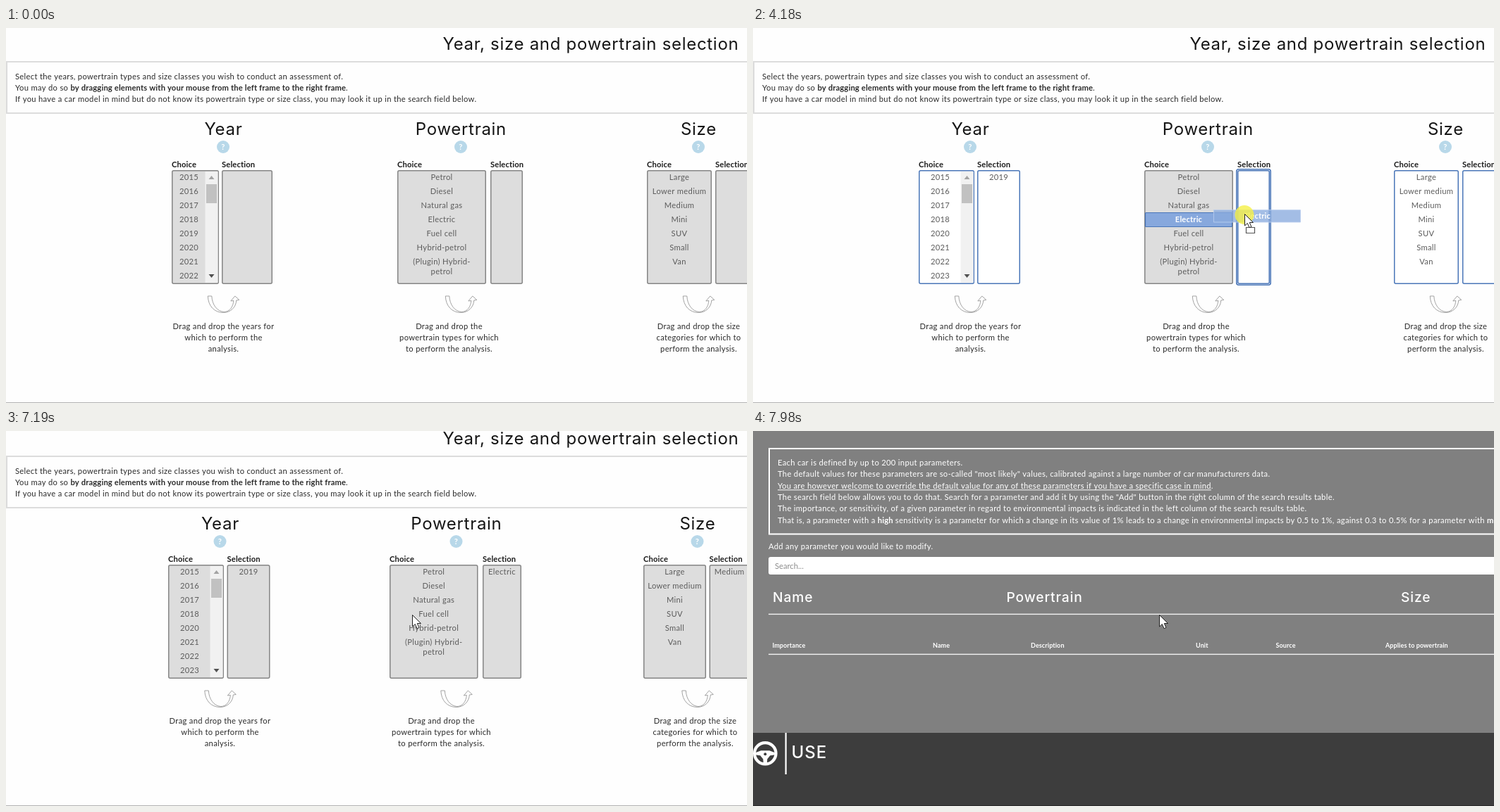
These frames come from a looping animation (1051 by 533 pixels, 8 s). An HTML page with a canvas:

```html
<!DOCTYPE html>
<html lang="en">
<head>
<meta charset="utf-8">
<title>Year, size and powertrain selection</title>
<style>
  html, body { margin: 0; width: 100%; height: 100%; overflow: hidden; background: #fff; }
  canvas { display: block; }
</style>
</head>
<body>
<canvas id="stage" width="1051" height="533"></canvas>
<script>
const LOOP = 8000, W = 1051, H = 533;
const ctx = document.getElementById('stage').getContext('2d');

const BLUE = '#4a76b8', ROW = '#87a8dd', GREY = '#dddddd', EDGE = '#858585';
const BODY = ['11.2px Lato, sans-serif', 0.32];
const BOLD = ['bold 11.2px Lato, sans-serif', 0.15];
const SMALL = ['bold 9px Lato, sans-serif', 0.1];
const HEAD = ['24px Inter, sans-serif', 0.7];
const CAPS = ['500 24px Inter, sans-serif', 1];
const TABLE = ['500 19.2px Inter, sans-serif', 0.9];

const columns = [
  { name: 'Year', pick: 4, scrolls: true,
    items: Array.from({ length: 12 }, (_, i) => String(2015 + i)),
    note: ['Drag and drop the years for', 'which to perform the', 'analysis.'] },
  { name: 'Powertrain', pick: 3,
    items: ['Petrol', 'Diesel', 'Natural gas', 'Electric', 'Fuel cell', 'Hybrid-petrol', '(Plugin) Hybrid-\npetrol'],
    note: ['Drag and drop the', 'powertrain types for which', 'to perform the analysis.'] },
  { name: 'Size', pick: 2,
    items: ['Large', 'Lower medium', 'Medium', 'Mini', 'SUV', 'Small', 'Van'],
    note: ['Drag and drop the size', 'categories for which to', 'perform the analysis.'] }
];

// Per column after each drop: heading, note, choice x and width, selection x and width
const layouts = [
  [[308, 308.5, 235, 67, 306, 72], [645, 628.5, 555, 126, 687, 46], [982, 982.5, 909, 92, 1006, 50]],
  [[308, 308.5, 235, 79, 318, 61], [645, 628.5, 555, 126, 687, 46], [982, 982.5, 909, 92, 1006, 50]],
  [[306, 306, 232.5, 79, 316, 61], [645, 624.5, 551, 125, 683, 54], [985, 985.5, 912, 91.5, 1008, 50]],
  [[303.5, 303.5, 230, 79, 313.5, 61], [638.5, 617.5, 544, 125.5, 676, 55], [980.5, 977.5, 904, 89, 997.5, 57]]
];

const drags = [
  { press: 1520, move: 1600, drop: 2090 },
  { press: 3570, move: 3710, drop: 4260 },
  { press: 5400, move: 5480, drop: 6320 }
];

// Pointer bursts: start, end, number of steps
const bursts = [
  [570, 1040, 7], [1520, 2090, 8], [2380, 3160, 11], [3240, 3310, 2],
  [3710, 4260, 8], [4550, 5320, 11], [5400, 6170, 11], [6650, 6870, 4]
];
const path = [
  [570, 167, 86], [1040, 268, 286], [1560, 268, 286], [2010, 332, 280], [2300, 332, 280],
  [2840, 619, 244], [3160, 621, 269], [3310, 621, 272], [3640, 621, 272], [4180, 697, 264],
  [4260, 698, 265], [4470, 698, 265], [5320, 944, 257], [5480, 944, 257], [6170, 1015, 247],
  [6580, 1014, 247], [6870, 576, 261]
];
const scrolls = [
  [0, 0], [7100, 2], [7190, 12], [7250, 50], [7330, 115], [7410, 195], [7490, 280],
  [7560, 355], [7640, 428], [7720, 490], [7810, 550], [7900, 595], [7980, 614]
];

const lastBefore = (list, t) => list.filter(e => e[0] <= t).pop();

function stepTime(t) {
  const burst = lastBefore(bursts, t);
  if (!burst) return t;
  const [from, to, n] = burst, gap = (to - from) / (n - 1);
  return Math.min(to, from + gap * Math.floor((t - from + 15) / gap));
}

function pointerAt(t) {
  if (t < path[0][0]) return null;
  const s = stepTime(t), a = lastBefore(path, s), b = path[path.indexOf(a) + 1];
  if (!b) return { x: a[1], y: a[2] };
  const u = (s - a[0]) / (b[0] - a[0]), e = u * u * (3 - 2 * u);
  return { x: a[1] + (b[1] - a[1]) * e, y: a[2] + (b[2] - a[2]) * e };
}

function setFont([font, gap]) {
  ctx.font = font;
  ctx.letterSpacing = gap + 'px';
}

function text(str, x, y, style, color, align = 'left') {
  setFont(style);
  ctx.textAlign = align;
  ctx.fillStyle = color;
  ctx.fillText(str, x, y);
  return ctx.measureText(str).width;
}

// Asterisks switch bold on and off
function rich(str, x, y, color) {
  str.split('*').forEach((part, i) => { x += text(part, x, y, i % 2 ? BOLD : BODY, color); });
}

function rect(x, y, w, h, color) {
  ctx.fillStyle = color;
  ctx.fillRect(x, y, w, h);
}

function frame(x, y, w, h, r, fill, stroke, weight) {
  ctx.beginPath();
  ctx.roundRect(x, y, w, h, r);
  if (fill) { ctx.fillStyle = fill; ctx.fill(); }
  if (stroke) { ctx.strokeStyle = stroke; ctx.lineWidth = weight; ctx.stroke(); }
}

function disc(x, y, r, color) {
  ctx.beginPath();
  ctx.arc(x, y, r, 0, 7);
  ctx.fillStyle = color;
  ctx.fill();
}

function polygon(points, fill) {
  ctx.beginPath();
  points.forEach(([x, y]) => ctx.lineTo(x, y));
  ctx.closePath();
  ctx.fillStyle = fill;
  ctx.fill();
}

function listBox(x, w, active, ring) {
  if (ring) frame(x - 1.2, 200.8, w + 2.4, 164.4, 3, '#fff', BLUE, 1.6);
  frame(x + 0.75, 202.75, w - 1.5, 160.5, 2, active ? '#fff' : GREY, active ? BLUE : EDGE, 1.5);
}

function scrollbar(x) {
  rect(x, 204, 18, 158, '#f1f1f1');
  rect(x + 1.5, 222, 15, 27, '#c1c1c1');
  polygon([[x + 5, 215], [x + 9, 210], [x + 13, 215]], '#a3a3a3');
  polygon([[x + 5, 350], [x + 9, 355], [x + 13, 350]], '#505050');
}

function curvedArrow(cx) {
  ctx.save();
  ctx.translate(cx, 381);
  ctx.beginPath();
  ctx.moveTo(-22, 0);
  ctx.lineTo(-16.5, 0);
  ctx.bezierCurveTo(-16, 12, -9, 22, 1, 22.5);
  ctx.bezierCurveTo(9, 22.5, 14, 15, 14.5, 6.5);
  ctx.lineTo(10.5, 7);
  ctx.lineTo(16.5, 0);
  ctx.lineTo(22.5, 5.5);
  ctx.lineTo(18.5, 6);
  ctx.bezierCurveTo(18, 16, 10, 23.5, 0, 23.5);
  ctx.bezierCurveTo(-13, 23.5, -21.5, 14, -22, 0);
  ctx.strokeStyle = '#8c8c8c';
  ctx.lineWidth = 0.8;
  ctx.stroke();
  ctx.restore();
}

function column(i, place, drops, held, dragging, pointer) {
  const col = columns[i], [head, note, cx, cw, sx, sw] = place;
  const moved = drops > i, own = held === i;
  const mid = col.scrolls ? cx + 0.5 + (cw - 19) / 2 : cx + cw / 2;
  const items = col.items.filter((_, k) => !(moved && k === col.pick)).slice(0, 8);

  text(col.name, head + 0.4, 151.5, HEAD, '#151515', 'center');
  disc(head, 169, 9, '#b8d8e9');
  text('?', head, 173, BOLD, '#fff', 'center');
  text('Choice', cx, 198, BOLD, '#1c1c1c');
  text('Selection', sx, 198, BOLD, '#1c1c1c');

  listBox(cx, cw, dragging && !own, false);
  listBox(sx, sw, dragging, dragging && own && pointer.x > sx);
  if (col.scrolls) scrollbar(cx + cw - 19.5);

  items.forEach((item, k) => {
    const y = 216 + 20 * k, on = own && k === col.pick;
    if (on) frame(cx + 1.5, y - 13.5, 2 * (mid - cx) - 3, 20, 1, ROW, BLUE, 1.2);
    item.split('\n').forEach((line, n) =>
      text(line, mid, y + 14 * n, on ? BOLD : BODY, on ? '#fff' : '#5c5c5c', 'center'));
  });
  if (moved) text(col.items[col.pick], sx + sw / 2, 216, BODY, '#5c5c5c', 'center');

  curvedArrow(head + 0.3);
  col.note.forEach((line, n) => text(line, note, 427.5 + 16.2 * n, BODY, '#2b2b2b', 'center'));
}

function selectionPart(drops, held, dragging, pointer) {
  text('Year, size and powertrain selection', 619.5, 31, HEAD, '#151515');
  frame(1, 48, W + 20, 73, 0, null, '#dcdcdc', 2.2);
  ['Select the years, powertrain types and size classes you wish to conduct an assessment of.',
   'You may do so *by dragging elements with your mouse from the left frame to the right frame*.',
   'If you have a car model in mind but do not know its powertrain type or size class, you may look it up in the search field below.'
  ].forEach((line, n) => rich(line, 13, 73 + 16.2 * n, '#2b2b2b'));
  layouts[drops].forEach((place, i) => column(i, place, drops, held, dragging, pointer));
}

function gear(x, y, r, teeth) {
  const points = [];
  for (let k = 0; k < teeth * 4; k++) {
    const a = (k - 0.5) * Math.PI / teeth / 2, d = k % 4 < 2 ? r : r * 0.76;
    points.push([x + d * Math.cos(a), y + d * Math.sin(a)]);
  }
  polygon(points, '#fff');
  disc(x, y, r * 0.42, '#808080');
}

function parametersPart() {
  rect(0, 545, W, 498, '#808080');
  gear(11, 570.5, 11.8, 8);
  gear(27.3, 563.8, 7.6, 8);
  rect(45.5, 545, 2.2, 48, '#fff');
  text('CAR PARAMETERS', 54, 576.5, CAPS, '#fff');

  frame(23, 639, W + 20, 121.5, 0, null, '#fff', 2);
  const lines = [
    'Each car is defined by up to 200 input parameters.',
    'The default values for these parameters are so-called "most likely" values, calibrated against a large number of car manufacturers data.',
    'You are however welcome to override the default value for any of these parameters if you have a specific case in mind.',
    'The search field below allows you to do that. Search for a parameter and add it by using the "Add" button in the right column of the search results table.',
    'The importance, or sensitivity, of a given parameter in regard to environmental impacts is indicated in the left column of the search results table.',
    'That is, a parameter with a *high* sensitivity is a parameter for which a change in its value of 1% leads to a change in environmental impacts by 0.5 to 1%, against 0.3 to 0.5% for a parameter with *medium*'
  ];
  lines.forEach((line, n) => rich(line, 35, 663 + 16.3 * n, '#fff'));
  setFont(BODY);
  rect(35, 697.3, ctx.measureText(lines[2].slice(0, -1)).width, 1, '#fff');

  text('Add any parameter you would like to modify.', 22, 782, BODY, '#fff');
  frame(22, 793, W, 25, 3, '#fff');
  text('Search...', 31, 810, ['11.2px Lato, sans-serif', 0], '#8c8c8c');

  [['Name', 28], ['Powertrain', 359.5], ['Size', 919]].forEach(([s, x]) => text(s, x, 857, TABLE, '#fff'));
  rect(22, 873.7, W, 1.4, '#f2f2f2');
  [['Importance', 27.5], ['Name', 255], ['Description', 394], ['Unit', 628], ['Source', 741.5],
   ['Applies to powertrain', 897]].forEach(([s, x]) => text(s, x, 922, SMALL, '#fff'));
  rect(22, 930.7, W, 1.4, '#f2f2f2');
}

function wheel(x, y) {
  ctx.beginPath();
  ctx.arc(x, y, 15.2, 0, 7);
  ctx.strokeStyle = '#fff';
  ctx.lineWidth = 4.2;
  ctx.stroke();
  polygon([[x - 14, y - 1], [x - 6, y - 4], [x + 6, y - 4], [x + 14, y - 1], [x + 14, y + 2],
    [x + 7, y + 3], [x + 3, y + 8], [x + 2.5, y + 14], [x - 2.5, y + 14], [x - 3, y + 8],
    [x - 7, y + 3], [x - 14, y + 2]], '#fff');
  disc(x, y + 1, 2, '#3d3d3d');
}

function usePart() {
  rect(0, 1043, W, 400, '#3d3d3d');
  wheel(17.3, 1072.3);
  rect(45.5, 1043, 2.2, 59, '#fff');
  text('USE', 54.5, 1079, CAPS, '#fff');
}

function ghost(i, place, { x, y }) {
  const col = columns[i], cx = place[2];
  const w = place[3] - (col.scrolls ? 21 : 3);
  const left = x - (path.find(p => p[0] > drags[i].press)[1] - cx) * 0.66;
  frame(left, y - 5.3, w, 17.3, 0, 'rgba(138,171,222,.78)', 'rgba(185,205,238,.9)', 1);
  text(col.items[col.pick], left + w / 2, y + 6.5, BOLD, '#fff', 'center');
}

function cursor({ x, y }) {
  ctx.save();
  ctx.translate(x + 0.5, y + 0.5);
  polygon([[0, 0], [0, 16.5], [3.8, 13], [6.6, 19.3], [9.4, 18], [6.8, 12], [12, 12]], '#fff');
  ctx.strokeStyle = '#222';
  ctx.lineWidth = 1;
  ctx.stroke();
  ctx.restore();
}

function draw(t) {
  const pointer = pointerAt(t);
  const drops = drags.filter(d => t >= d.drop).length;
  const held = drags.findIndex(d => t >= d.press && t < d.drop);
  const dragging = held >= 0 && t >= drags[held].move;

  rect(0, 0, W, H, '#fefefe');
  ctx.save();
  ctx.translate(0, -lastBefore(scrolls, t)[1]);
  selectionPart(drops, held, dragging, pointer);
  parametersPart();
  usePart();
  ctx.restore();
  rect(0, 532, W, 1, 'rgba(0,0,0,.3)');

  if (dragging) ghost(held, layouts[drops][held], pointer);
  if (held >= 0) disc(pointer.x, pointer.y + 1.5, 13.5, 'rgba(245,240,70,.8)');
  if (dragging) frame(pointer.x + 2.5, pointer.y + 19.5, 12, 8, 0, '#fff', '#555', 1.2);
  if (pointer) cursor(pointer);
}

const start = performance.now();
function tick() {
  draw((performance.now() - start) % LOOP);
  requestAnimationFrame(tick);
}
tick();
</script>
</body>
</html>
```
